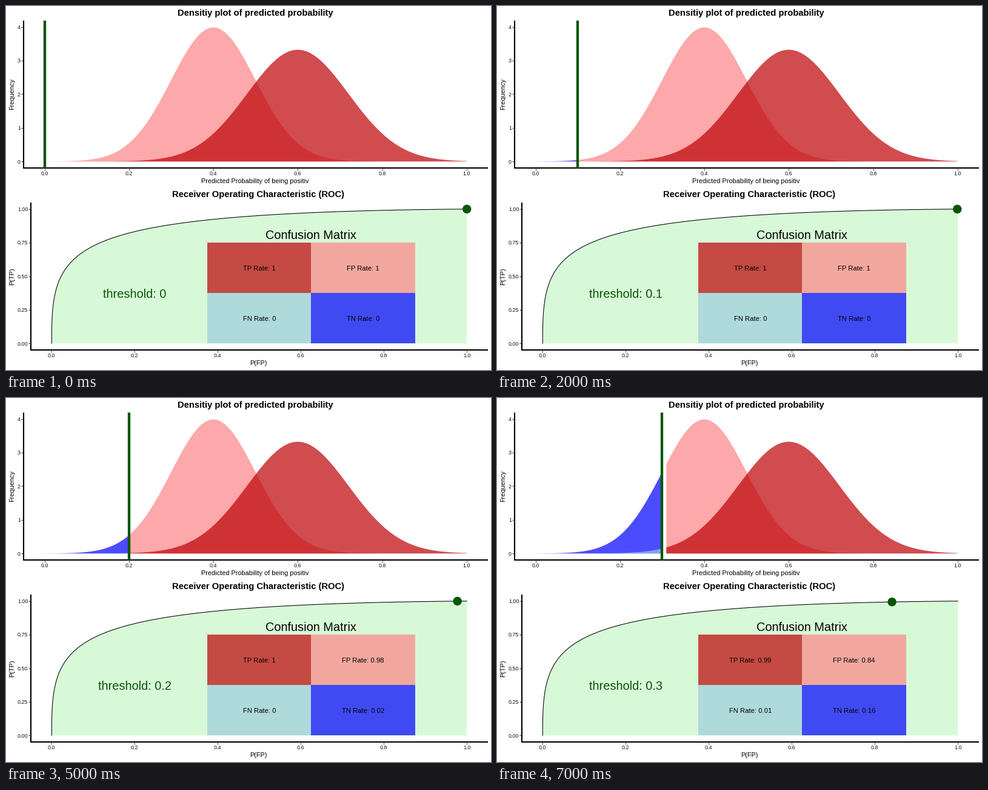
These frames come from a looping animation (800x600 px, 8 s). A matplotlib script:

```python
import math

import numpy as np
import matplotlib.pyplot as plt
from matplotlib.animation import FuncAnimation
from matplotlib.patches import Circle, Polygon, Rectangle

plt.rcParams["font.family"] = "Liberation Sans"
PX = 0.72  # points per pixel at 100 dpi

DARK_RED = "#bc0004"
PINK = "#fd8486"
PALE_BLUE = "#9ecddd"
BLUE = "#0000ff"
DARK_GREEN = "#065604"
PALE_GREEN = "#d8f9d8"
TICK = "#333333"
ALPHA = 0.7

NEG = (0.4, 0.10)
POS = (0.6, 0.12)
GRID = np.arange(101) * 0.01

fig = plt.figure(figsize=(8, 6), dpi=100, facecolor="white")
ax = fig.add_axes([0, 0, 1, 1])
ax.set_xlim(0, 800)
ax.set_ylim(600, 0)
ax.axis("off")


class Panel:
    """Maps data values to stage pixels."""

    def __init__(self, x0, x1, y0, unit, left, top, bottom):
        self.x0, self.x1, self.y0, self.unit = x0, x1, y0, unit
        self.left, self.top, self.bottom = left, top, bottom

    def x(self, v):
        return self.x0 + v * (self.x1 - self.x0)

    def y(self, v):
        return self.y0 - v * self.unit

    def area(self, xs, ys):
        xs, ys = np.asarray(xs, float), np.asarray(ys, float)
        px = np.concatenate([self.x(xs), self.x(xs[::-1])])
        py = np.concatenate([self.y(ys), self.y(ys[::-1] * 0)])
        return np.column_stack([px, py])


def density(x, dist):
    mean, sd = dist
    return np.exp(-0.5 * ((x - mean) / sd) ** 2) / (sd * math.sqrt(2 * math.pi))


def upper_tail(t, dist):
    mean, sd = dist
    return 0.5 * (1 - math.erf((t - mean) / (sd * math.sqrt(2))))


def text(x, y, s, size, **kw):
    kw = {"ha": "center", "va": "baseline", "color": "black", **kw}
    return ax.text(x, y, s, fontsize=size * PX, **kw)


def line(xs, ys, color, width, **kw):
    return ax.plot(xs, ys, color=color, lw=width * PX, **kw)[0]


def draw_axes(p, title, xlabel, ylabel, yticks, yfmt, mid):
    line([p.left, p.left, 794.5], [p.top, p.bottom, p.bottom], "black", 2.1,
         solid_capstyle="butt", solid_joinstyle="miter", zorder=6)
    for v in np.arange(6) / 5:
        line([p.x(v)] * 2, [p.bottom + 1, p.bottom + 4], TICK, 1,
             solid_capstyle="butt")
        text(p.x(v), p.bottom + 12, f"{v:.1f}", 8.9, color="#111111")
    for v in yticks:
        line([p.left - 4, p.left - 1], [p.y(v)] * 2, TICK, 1,
             solid_capstyle="butt")
        text(p.left - 4.7, p.y(v) + 3.3, yfmt.format(v), 8.9, ha="right",
             color="#111111")
    text(mid, p.top - 8, title, 14.8, weight="bold")
    text(mid, p.bottom + 25, xlabel, 10.9)
    text(13.3, (p.top + p.bottom) / 2, ylabel, 10.9, rotation=90,
         rotation_mode="anchor")


top = Panel(63.5, 759.8, 256.3, 55.43, 28.6, 24, 267)
low = Panel(75.3, 760.2, 556.2, 221.4, 41.2, 323.5, 567)

draw_axes(top, "Densitiy plot of predicted probability",
          "Predicted Probability of being positiv", "Frequency",
          range(5), "{:d}", 411.2)
draw_axes(low, "Receiver Operating Characteristic (ROC)", "P(FP)", "P(TP)",
          np.arange(5) / 4, "{:.2f}", 416.5)


def fill(color, z):
    shape = Polygon([(0, 0), (0, 0)], closed=True, fc=color, ec="none",
                    lw=0, alpha=ALPHA, zorder=z)
    return ax.add_patch(shape)


# Density areas, negatives below positives
tn_area, fp_area = fill(BLUE, 2), fill(PINK, 2)
fn_area, tp_area = fill(PALE_BLUE, 3), fill(DARK_RED, 3)
marker = line([0, 0], [top.top, top.bottom], DARK_GREEN, 4.3,
              solid_capstyle="butt", zorder=7)

# ROC curve
fpr = np.array([upper_tail(t, NEG) for t in GRID[::-1]])
tpr = np.array([upper_tail(t, POS) for t in GRID[::-1]])
ax.add_patch(Polygon(low.area(fpr, tpr), fc=PALE_GREEN, ec="none", zorder=1))
line(low.x(fpr), low.y(tpr), "black", 1.05, zorder=2)
dot = ax.add_patch(Circle((0, 0), 7.2, fc=DARK_GREEN, ec="none", zorder=7))

# Confusion matrix
text(low.x(0.625), 384, "Confusion Matrix", 19.95, zorder=5)
threshold_text = text(low.x(0.2), 481, "", 19.95, color=DARK_GREEN, zorder=5)
cells = {}
for name, x, y, color in [("TP", 0.375, 0.375, DARK_RED),
                          ("FP", 0.625, 0.375, PINK),
                          ("FN", 0.375, 0, PALE_BLUE),
                          ("TN", 0.625, 0, BLUE)]:
    w, h = 0.25 * (low.x1 - low.x0), 0.375 * low.unit
    ax.add_patch(Rectangle((low.x(x), low.y(y) - h), w, h, fc=color,
                           ec="none", lw=0, alpha=ALPHA, zorder=3))
    cells[name] = text(low.x(x) + w / 2, low.y(y) - h / 2 + 4.2, "", 11.3,
                       zorder=5)


def update(step):
    t = (step // 2) * 0.1
    below, above = GRID[GRID <= t], GRID[GRID >= t]
    for shape, xs, dist in [(tn_area, below, NEG), (fp_area, above, NEG),
                            (fn_area, below, POS), (tp_area, above, POS)]:
        shape.set_xy(top.area(xs, density(xs, dist)))
    marker.set_xdata([top.x(t)] * 2)

    fp, tp = upper_tail(t, NEG), upper_tail(t, POS)
    dot.center = low.x(fp), low.y(tp)
    threshold_text.set_text(f"threshold: {t:g}")
    rates = {"TP": tp, "FP": fp, "FN": 1 - tp, "TN": 1 - fp}
    for name, rate in rates.items():
        cells[name].set_text(f"{name} Rate: {round(rate, 2):g}")
    return []


anim = FuncAnimation(fig, update, frames=8, interval=1000, repeat=True,
                     repeat_delay=0, blit=False)
plt.show()
```
